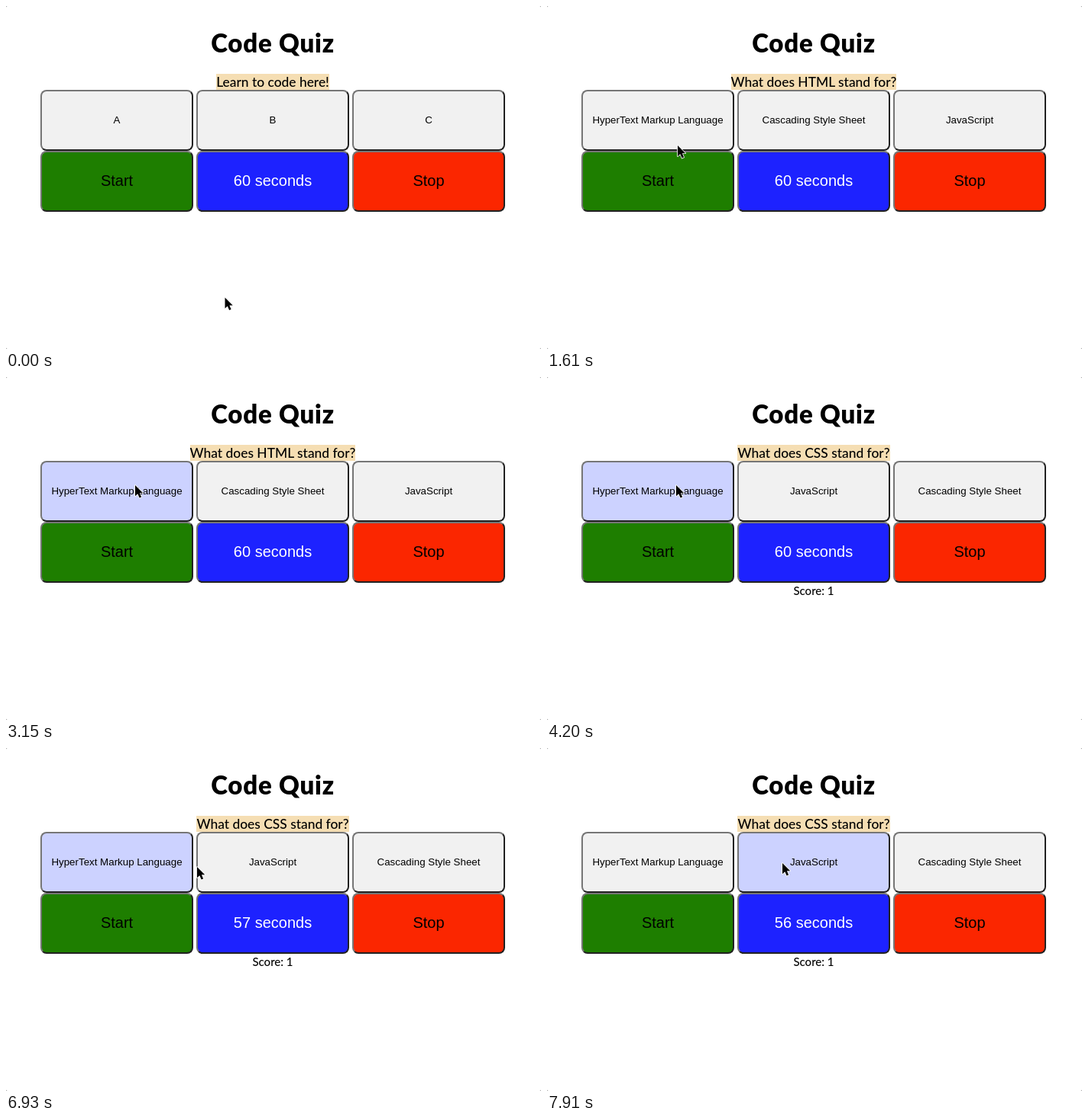
An HTML page that plays this animation: 700x450 px, repeating every 8 s.

```html
<!DOCTYPE html>
<html lang="en">
<head>
<meta charset="utf-8">
<title>Code Quiz</title>
<style>
  html, body { margin: 0; width: 100%; height: 100%; overflow: hidden; background: #8a8a8a; }
  #stage {
    position: relative; width: 700px; height: 450px; overflow: hidden;
    background: #fff; border-radius: 2px; color: #000;
    font-family: Lato, "Open Sans", sans-serif;
  }
  h1, .line { position: absolute; left: 0; width: 698px; margin: 0; text-align: center; white-space: nowrap; }
  h1 { top: 28px; font-size: 33px; line-height: 40px; font-weight: 900; letter-spacing: .8px; }
  #question { top: 89px; height: 21px; font-size: 17.4px; font-weight: 500; }
  #question span { display: inline-block; line-height: 22px; height: 21px; background: #f5deb3; }
  #score { top: 270px; font-size: 15px; line-height: 20px; font-weight: 500; }
  .btn {
    position: absolute; box-sizing: border-box; width: 200px; height: 80px;
    border: 2px solid; border-color: #767676 #212121 #212121 #767676; border-radius: 8px;
    background: #f1f1f1; text-align: center; white-space: nowrap;
    font: 13.333px/75px "Liberation Sans", Arial, sans-serif;
  }
  .btn.hover { background: #ccd2ff; }
  .big { top: 190px; font-size: 20px; line-height: 75px; }
  .answer { top: 110px; }
  .c0 { left: 45px; } .c1 { left: 249px; } .c2 { left: 453px; }
  #start { background: #1e7e00; }
  #timer { background: #1d22ff; color: #fff; }
  #stop { background: #fb2600; }
  #cursor { position: absolute; left: 0; top: 0; overflow: visible; }
</style>
</head>
<body>
<div id="stage">
  <h1>Code Quiz</h1>
  <div id="question" class="line"><span></span></div>
  <div class="btn answer c0"></div>
  <div class="btn answer c1"></div>
  <div class="btn answer c2"></div>
  <div id="start" class="btn big c0">Start</div>
  <div id="timer" class="btn big c1"></div>
  <div id="stop" class="btn big c2">Stop</div>
  <div id="score" class="line">Score: 1</div>
  <svg id="cursor" width="12" height="19">
    <path d="M0 0V14.2L3.3 11.2L5.6 16.6L8.1 15.5L5.9 10.2H10.2Z"
      fill="#000" stroke="#fff" stroke-width="1.6" stroke-linejoin="round" paint-order="stroke"/>
  </svg>
</div>
<script>
const LOOP = 8000, STEP = 70, TICK = 910, FIRST_TICK = 4200;

const screens = [
  { at: 0, question: "Learn to code here!", answers: ["A", "B", "C"] },
  { at: 1470, question: "What does HTML stand for?",
    answers: ["HyperText Markup Language", "Cascading Style Sheet", "JavaScript"] },
  { at: 3290, question: "What does CSS stand for?",
    answers: ["HyperText Markup Language", "JavaScript", "Cascading Style Sheet"] }
];

// Cursor path: time, x, y
const path = [
  [140, 286.5, 382.5], [420, 225, 305], [700, 160, 224],
  [1400, 160, 224], [1540, 169, 200], [1610, 171, 183], [1680, 171, 172],
  [1890, 171, 172], [2100, 169, 142],
  [6790, 169, 142], [6860, 198, 148], [6930, 250, 156], [7000, 273, 158],
  [7140, 300, 154], [7280, 308, 151]
];

const $ = s => document.querySelector(s);
const question = $("#question span"), timer = $("#timer"), score = $("#score"), cursor = $("#cursor");
const answers = [...document.querySelectorAll(".answer")];

function cursorAt(t) {
  const next = path.findIndex(p => p[0] > t);
  if (next === 0) return path[0].slice(1);
  if (next < 0) return path[path.length - 1].slice(1);
  const [t0, x0, y0] = path[next - 1], [t1, x1, y1] = path[next];
  const k = (t - t0) / (t1 - t0);
  return [x0 + (x1 - x0) * k, y0 + (y1 - y0) * k];
}

function setText(el, text) {
  if (el.textContent !== text) el.textContent = text;
}

function render(now) {
  const t = Math.floor((now % LOOP) / STEP) * STEP;
  const screen = screens.filter(s => s.at <= t).pop();
  const [x, y] = cursorAt(t);
  const [hx, hy] = cursorAt(t - STEP); // hover trails the pointer by one step

  setText(question, screen.question);
  answers.forEach((el, i) => {
    const left = 45 + 204 * i;
    setText(el, screen.answers[i]);
    el.classList.toggle("hover", hx >= left && hx < left + 200 && hy >= 110 && hy < 190);
  });
  const ticks = Math.max(0, Math.floor((t - FIRST_TICK) / TICK));
  setText(timer, 60 - ticks + " seconds");
  score.style.visibility = t >= 3290 ? "visible" : "hidden";
  cursor.style.transform = `translate(${x}px, ${y}px)`;
}

const begin = performance.now();
function loop() {
  render(performance.now() - begin);
  requestAnimationFrame(loop);
}
loop();
</script>
</body>
</html>
```
